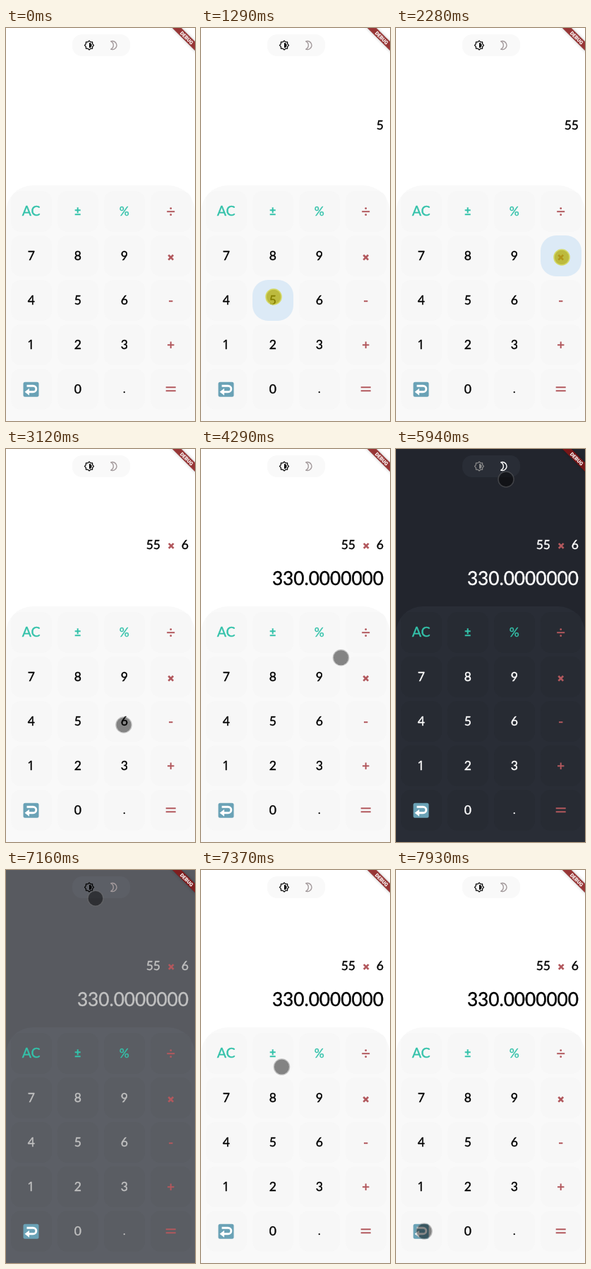
These frames come from a looping animation (268x557 px, 8 s). An HTML page with a canvas:

```html
<!DOCTYPE html>
<html lang="en">
<head>
<meta charset="utf-8">
<title>Calculator</title>
<style>
html, body { margin: 0; width: 100%; height: 100%; overflow: hidden; background: #fff; }
canvas { display: block; width: 268px; height: 557px; }
</style>
</head>
<body>
<canvas id="stage"></canvas>
<script>
const W = 268, H = 557, LOOP = 8000;
const canvas = document.getElementById('stage');
const ctx = canvas.getContext('2d');
const dpr = window.devicePixelRatio || 1;
canvas.width = W * dpr;
canvas.height = H * dpr;

const RED = '#b2585d', TEAL = '#34c2aa';
const LIGHT = { bg: [255, 255, 255], panel: [249, 249, 249], key: [247, 247, 247], ink: [0, 0, 0] };
const DARK = { bg: [34, 37, 45], panel: [41, 45, 54], key: [39, 43, 51], ink: [255, 255, 255] };

const KEYS = ['AC', '±', '%', '÷', '7', '8', '9', '×', '4', '5', '6', '-',
  '1', '2', '3', '+', 'back', '0', '.', '='];

// Each stop: when the pointer sets off, when it arrives, and what it taps there
const HOLD = 140;
const START = { x: 238, y: 473 };
const STOPS = [
  { leave: 190, arrive: 1000, x: 103, y: 381, lift: -300, key: '5', taps: [1020, 1230] },
  { leave: 1430, arrive: 1780, x: 235, y: 325, key: '×', taps: [2150] },
  { leave: 2500, arrive: 2900, x: 167, y: 391, key: '6', taps: [2930] },
  { leave: 3130, arrive: 3260, x: 184, y: 433 },
  { leave: 3400, arrive: 3700, x: 235, y: 512, key: '=', taps: [3760] },
  { leave: 3960, arrive: 5100, x: 152, y: 21, key: 'dark', taps: [5500] },
  { leave: 5700, arrive: 5940, x: 156, y: 43 },
  { leave: 6280, arrive: 6630, x: 121, y: 21, key: 'light', taps: [6880] },
  { leave: 7030, arrive: 7160, x: 127, y: 39 },
  { leave: 7160, arrive: 7790, x: 102, y: 517 },
  { leave: 7790, arrive: 7930, x: 40, y: 512 }
];
const TAPS = STOPS.flatMap(({ key, taps = [] }) =>
  taps.map(down => ({ key, down, up: down + HOLD })));
const upTime = key => TAPS.find(tap => tap.key === key).up;

const clamp = v => Math.max(0, Math.min(1, v));
const mix = (a, b, k) => a + (b - a) * k;
const easeOut = k => Math.sin(k * Math.PI / 2);

function themeAt(t) {
  const k = clamp((t - upTime('dark') - 20) / 200) - clamp((t - upTime('light') - 92) / 200);
  const out = {};
  for (const name in LIGHT) {
    out[name] = `rgb(${LIGHT[name].map((v, i) => Math.round(mix(v, DARK[name][i], k)))})`;
  }
  return out;
}

function pointerAt(t) {
  let pos = START;
  for (const stop of STOPS) {
    if (t < stop.leave) break;
    const k = easeOut(clamp((t - stop.leave) / (stop.arrive - stop.leave)));
    const arc = 2 * k * (1 - k) * (stop.lift || 0);
    pos = { x: mix(pos.x, stop.x, k), y: mix(pos.y, stop.y, k) + arc };
  }
  return pos;
}

function box(x, y, w, h, r, color) {
  ctx.fillStyle = color;
  ctx.beginPath();
  ctx.roundRect(x, y, w, h, r);
  ctx.fill();
}

// The thin outline gives the regular face a medium weight
function label(str, x, y, size, color, align = 'center', family = 'Lato') {
  ctx.font = `${size}px ${family}, sans-serif`;
  ctx.textAlign = align;
  ctx.fillStyle = ctx.strokeStyle = color;
  ctx.lineWidth = 0.4;
  ctx.fillText(str, x, y);
  ctx.strokeText(str, x, y);
}

function lines(color, width, ...segs) {
  ctx.strokeStyle = color;
  ctx.lineWidth = width;
  ctx.beginPath();
  for (const [x1, y1, x2, y2] of segs) {
    ctx.moveTo(x1, y1);
    ctx.lineTo(x2, y2);
  }
  ctx.stroke();
}

function dot(x, y, r, color) {
  ctx.fillStyle = color;
  ctx.beginPath();
  ctx.arc(x, y, r, 0, Math.PI * 2);
  ctx.fill();
}

function times(x, y) {
  const r = 3.4;
  lines(RED, 2.7, [x - r, y - r, x + r, y + r], [x - r, y + r, x + r, y - r]);
}

function backIcon(x, y) {
  box(x - 11, y - 10.5, 22, 21, 2.5, '#6aa2b6');
  ctx.strokeStyle = '#fff';
  ctx.lineWidth = 2.9;
  ctx.beginPath();
  ctx.moveTo(x - 6, y - 5);
  ctx.lineTo(x + 3, y - 5);
  ctx.arc(x + 3, y - 0.7, 4.3, -Math.PI / 2, Math.PI / 2);
  ctx.lineTo(x - 4, y + 3.6);
  ctx.stroke();
  ctx.fillStyle = '#fff';
  ctx.beginPath();
  ctx.moveTo(x - 9, y + 3.6);
  ctx.lineTo(x - 2.5, y - 1.4);
  ctx.lineTo(x - 2.5, y + 8.6);
  ctx.fill();
}

function keyFace(name, x, y, ink) {
  const base = y + 6;
  switch (name) {
    case 'AC': label(name, x, base, 19.5, TEAL); break;
    case '%': label(name, x, base, 17.5, TEAL); break;
    case '±':
      lines(TEAL, 2, [x - 4, y - 2, x + 4, y - 2], [x, y - 6, x, y + 2], [x - 4, y + 4, x + 4, y + 4]);
      break;
    case '÷':
      lines(RED, 2, [x - 5.5, y, x + 5.5, y]);
      dot(x, y - 4.5, 1.4, RED);
      dot(x, y + 4.5, 1.4, RED);
      break;
    case '×': times(x, y + 2); break;
    case '-': lines(RED, 2, [x - 2.7, y + 1, x + 2.7, y + 1]); break;
    case '+': lines(RED, 2, [x - 4.7, y, x + 4.7, y], [x, y - 4.7, x, y + 4.7]); break;
    case '=': lines(RED, 2, [x - 7, y - 3, x + 7, y - 3], [x - 7, y + 2, x + 7, y + 2]); break;
    case 'back': backIcon(x - 0.2, y); break;
    case '.': dot(x, y + 4, 1.1, ink); break;
    case '1': label(name, x - 0.5, base, 17.5, ink, 'center', '"Open Sans"'); break;
    default: label(name, x, base, 17.5, ink);
  }
}

function keypad(theme, pressed) {
  box(0, 223, W, H, 38, theme.panel);
  KEYS.forEach((name, i) => {
    const x = 7 + (i % 4) * 66, y = 231 + Math.floor(i / 4) * 63;
    const on = name === pressed;
    box(x, y, 58, 58, on ? 22 : 14, on ? '#dceaf6' : theme.key);
    keyFace(name, x + 28.7, y + 29.2, theme.ink);
  });
}

function sunIcon(color) {
  ctx.save();
  ctx.translate(118, 24.5);
  ctx.scale(0.64, 0.64);
  ctx.strokeStyle = ctx.fillStyle = color;
  ctx.lineWidth = 1.9;
  ctx.beginPath();
  for (let i = 0; i < 16; i++) {
    const r = i % 2 ? 7.9 : 10.1, a = i * Math.PI / 8;
    ctx.lineTo(r * Math.cos(a), r * Math.sin(a));
  }
  ctx.closePath();
  ctx.stroke();
  ctx.beginPath();
  ctx.arc(0, 0, 5.5, -Math.PI / 2, Math.PI / 2);
  ctx.fill();
  ctx.restore();
}

function moonIcon(color) {
  ctx.strokeStyle = color;
  ctx.lineWidth = 1.4;
  ctx.beginPath();
  ctx.arc(150.9, 24.5, 6, -1.95, 1.95);
  ctx.quadraticCurveTo(152.3, 28.2, 152.3, 24.5);
  ctx.quadraticCurveTo(152.3, 20.8, 148.7, 18.9);
  ctx.closePath();
  ctx.stroke();
}

function toggle(theme, dark) {
  box(94, 9, 82, 31, 14, theme.panel);
  sunIcon(dark ? '#8c8c8c' : '#000');
  moonIcon(dark ? '#fff' : '#a39a9c');
}

// The expression grows leftwards from the right margin
function display(t, ink) {
  const typed = TAPS.filter(tap => tap.up <= t).map(tap => tap.key).join('');
  const expr = typed.match(/^[\d×]*/)[0];
  const base = expr.includes('×') ? 142 : 144;
  let x = 259;
  for (const ch of [...expr].reverse()) {
    if (ch === '×') {
      if (x < 259) x -= 10;
      times(x - 4.8, base - 4.7);
      x -= 20;
    } else {
      label(ch, x, base, 17.5, ink, 'right');
      x -= 10;
    }
  }
  if (typed.includes('=')) label((55 * 6).toFixed(7), 259, 193, 26.2, ink, 'right');
}

function banner() {
  ctx.save();
  ctx.translate(256.3, 14);
  ctx.rotate(Math.PI / 4);
  ctx.shadowColor = 'rgba(0,0,0,.5)';
  ctx.shadowBlur = 4 * dpr;
  ctx.fillStyle = 'rgba(0,0,0,.5)';
  ctx.fillRect(-30, -4.5, 60, 9);
  ctx.shadowColor = 'transparent';
  ctx.fillStyle = 'rgba(183,28,28,.627)';
  ctx.fillRect(-30, -4.5, 60, 9);
  ctx.font = '900 7.2px Roboto, sans-serif';
  ctx.textAlign = 'center';
  ctx.fillStyle = '#fff';
  ctx.fillText('DEBUG', 0, 2.6);
  ctx.restore();
}

function pointer({ x, y }, down) {
  dot(x, y, 10.5, down ? 'rgba(178,170,0,.75)' : 'rgba(0,0,0,.47)');
  ctx.strokeStyle = down ? 'rgba(210,214,80,.85)' : 'rgba(110,110,110,.4)';
  ctx.lineWidth = 1.6;
  ctx.beginPath();
  ctx.arc(x, y, 11, 0, Math.PI * 2);
  ctx.stroke();
}

function draw(t) {
  const theme = themeAt(t);
  const tap = TAPS.find(({ down, up }) => t >= down && t < up);
  ctx.setTransform(dpr, 0, 0, dpr, 0, 0);
  ctx.lineJoin = 'round';
  ctx.fillStyle = theme.bg;
  ctx.fillRect(0, 0, W, H);
  toggle(theme, t >= upTime('dark') && t < upTime('light'));
  display(t, theme.ink);
  keypad(theme, tap && tap.key);
  banner();
  if (t >= STOPS[0].leave) pointer(pointerAt(t), !!tap);
}

const start = performance.now();
function tick() {
  draw((performance.now() - start) % LOOP);
  requestAnimationFrame(tick);
}
tick();
</script>
</body>
</html>
```
